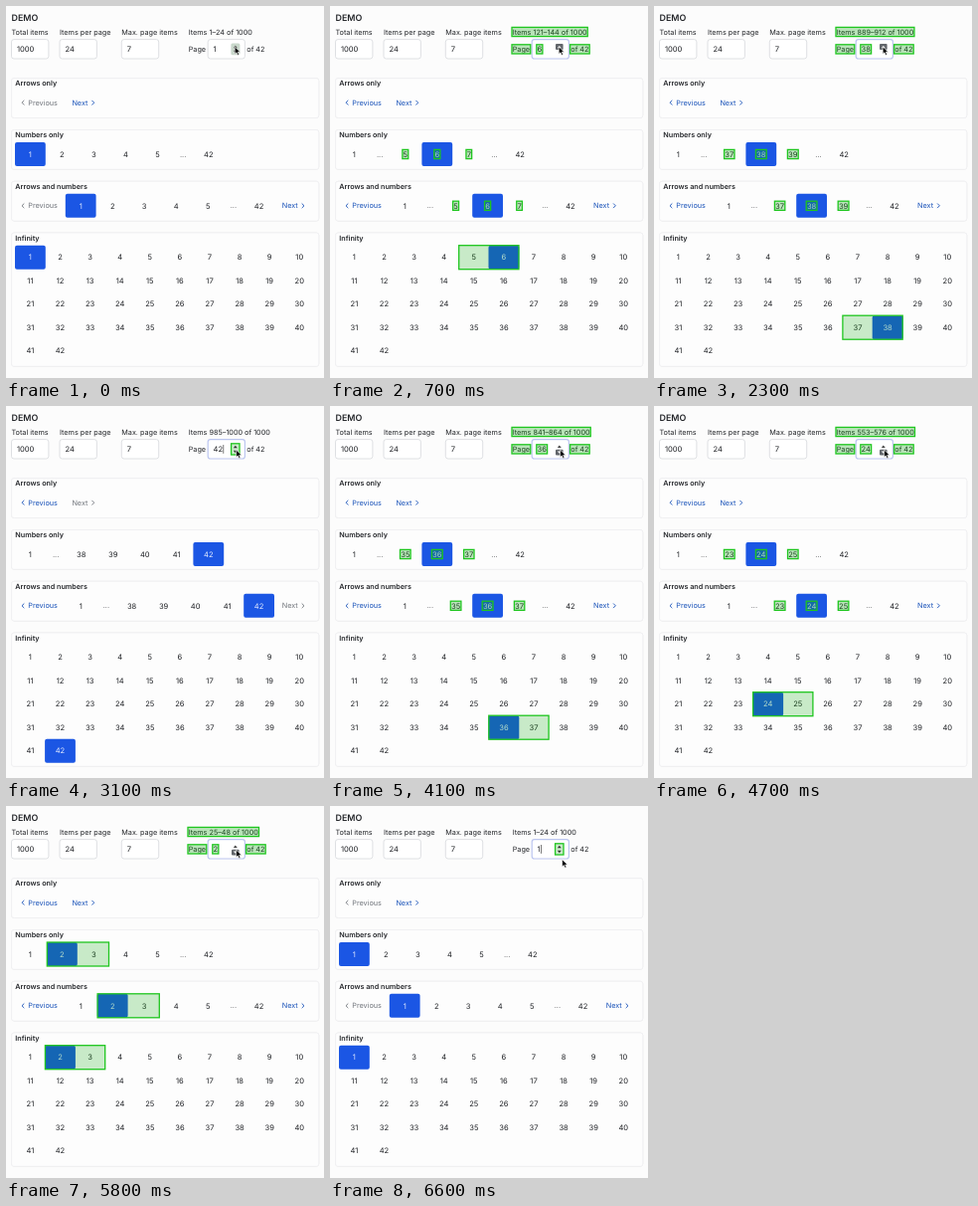
Recreate the animation shown at these times as an HTML page. Size 320 px wide and 374 px high, loop 6.7 s.

```html
<!DOCTYPE html>
<html lang="en">
<head>
<meta charset="utf-8">
<title>Pagination demo</title>
<style>
  html, body { margin: 0; width: 100%; height: 100%; overflow: hidden; background: #fcfcfc; }
  svg { display: block; width: 100vw; height: 100vh; }
  text { font: 7.25px Inter, "Liberation Sans", sans-serif; fill: #222428; text-rendering: geometricPrecision; }
  .title { font-size: 7.2px; font-weight: 600; fill: #24262a; }
  .big { font-size: 8.9px; }
  .num { font-size: 7.6px; }
  .mid { text-anchor: middle; }
  .on { fill: #e4ecff; }
  .link { fill: #1650b8; stroke: #1650b8; }
  .off { fill: #70747b; stroke: #70747b; }
  text.link, text.off { stroke: none; }
  path.link, path.off { fill: none; stroke-width: .9; }
  .card { fill: #fdfdfd; stroke: #efeff1; stroke-width: .8; filter: drop-shadow(0 .5px .5px rgb(0 0 0 / .09)); }
  .field { fill: #fff; stroke: #d6d8dc; stroke-width: .8; }
  .focus { stroke: #bcc6f0; stroke-width: 1.2; }
  .btn { fill: #1b56e4; }
  .flash { fill: rgb(0 160 0 / .21); stroke: #1fc61f; stroke-width: 1.3; }
  .word { fill: rgb(0 160 0 / .27); }
  .tip { font-size: 5.5px; fill: #ddd; }
</style>
</head>
<body>
<svg viewBox="0 0 320 374" preserveAspectRatio="none">
  <g id="base"></g>
  <g id="live"></g>
</svg>
<script>
const LOOP = 6700, STEP = 100, PAGES = 42, TOTAL = 1000, SIZE = 24;
const BTN = 30, DOTS = 17.4, GAP = 2, BTN_H = 24;
const TEXT_SIZE = 7.25, NUM_SIZE = 7.6;
const TIP_STEPS = [14, 17, 24, 30, 51, 57];

const pen = document.createElement('canvas').getContext('2d');
pen.font = '100px Inter, "Liberation Sans", sans-serif';

const clamp = (v, lo, hi) => Math.min(hi, Math.max(lo, v));
const isNum = s => typeof s === 'number';
const widthOf = s => pen.measureText(s).width / 100 * (isNum(s) ? NUM_SIZE : TEXT_SIZE);
const rect = (cls, x, y, w, h, r = 0) =>
  `<rect class="${cls}" x="${x}" y="${y}" width="${w}" height="${h}" rx="${r}"/>`;
// Text is placed by the vertical centre of its capitals.
const label = (s, x, y, cls = '') =>
  `<text class="${cls}${isNum(s) ? ' num' : ''}" x="${x}" y="${y + (isNum(s) ? 2.75 : 2.6)}">${s}</text>`;
const flash = (x, y, w, h) => rect('flash', x, y, w, h);
const flashText = (s, x, y) => rect('flash word', x - .7, y - 4.6, widthOf(s) + 1.4, 9.2);
const flashMid = (s, x, y) => flashText(s, x - widthOf(s) / 2, y);
const button = (x, y) => rect('btn', x - BTN / 2 - .4, y - BTN_H / 2, BTN + .8, BTN_H, 2);

function flashCells(a, b) {
  const cell = c => flash(c.x - 15.1, c.y - 12, 30.2, 24);
  if (a.y !== b.y) return cell(a) + cell(b);
  const left = Math.min(a.x, b.x);
  return flash(left - 15.1, a.y - 12, Math.abs(a.x - b.x) + 30.2, 24);
}

function base() {
  const fields = [['Total items', 1000, 5.5], ['Items per page', 24, 54], ['Max. page items', 7, 116.3]];
  const cards = [['Arrows only', 72.7, 39.8], ['Numbers only', 124.5, 39.8],
                 ['Arrows and numbers', 176.3, 39.8], ['Infinity', 228, 134.3]];
  return `<text class="title big" x="5.5" y="15.2">DEMO</text>` +
    fields.map(([name, v, x]) =>
      label(name, x, 26) + rect('field', x, 33.6, 37.4, 19.4, 2.5) + label(v, x + 5.4, 43.4)).join('') +
    cards.map(([name, y, h]) => rect('card', 5.6, y, 309.2, h, 2.5) + label(name, 9.3, y + 5.1, 'title')).join('');
}

// A click, a pause, then two pages per step while the stepper is held.
function pageAt(step) {
  if (step < 1) return 1;
  return step < 34 ? clamp(2 * step - 8, 2, PAGES) : clamp(118 - 2 * step, 1, PAGES - 1);
}

function itemsFor(p) {
  if (p < 5) return [1, 2, 3, 4, 5, 0, PAGES];
  if (p > 38) return [1, 0, 38, 39, 40, 41, PAGES];
  return [1, 0, p - 1, p, p + 1, 0, PAGES];
}

function arrow(next, x, y, enabled) {
  const cls = enabled ? 'link' : 'off';
  const tipX = next ? x + 20 : x - 4;
  const d = next ? `M${tipX} ${y - 2.3}l2.3 2.3-2.3 2.3` : `M${tipX} ${y - 2.3}l-2.3 2.3 2.3 2.3`;
  return label(next ? 'Next' : 'Previous', x, y, cls) + `<path class="${cls}" d="${d}"/>`;
}

// Draws the number row; returns its markup and the centre of the last button.
function numbers(x, y, p, prev, moving) {
  const at = {};
  let html = '', marks = '', last = 0;
  for (const n of itemsFor(p)) {
    const w = n ? BTN : DOTS;
    last = x + w / 2;
    if (n) at[n] = { x: last, y };
    if (n === p) html += button(last, y);
    html += label(n || '...', last, y, n === p ? 'mid on' : 'mid');
    x += w + GAP;
  }
  if (moving) {
    marks = p > 4 && p < 39
      ? [p - 1, p, p + 1].map(n => flashMid(n, at[n].x, y)).join('')
      : flashCells(at[p], at[prev]);
  }
  return { html: html + marks, last };
}

const cellAt = n => ({ x: 24.4 + (n - 1) % 10 * 30.1, y: 252.7 + Math.floor((n - 1) / 10) * 23.5 });

function grid(p, prev, moving) {
  let html = '';
  for (let n = 1; n <= PAGES; n++) {
    const { x, y } = cellAt(n);
    if (n === p) html += button(x, y);
    html += label(n, x, y, n === p ? 'mid on' : 'mid');
  }
  return html + (moving ? flashCells(cellAt(p), cellAt(prev)) : '');
}

function stepper(step) {
  const up = step > 0 && step < 26, down = step > 33 && step < 60;
  const arrowHead = (y, dir, color) =>
    `<path d="M228.8 ${y}h4l-2 ${2.4 * dir}z" fill="${color}"/>`;
  if (up) return `<rect x="227" y="38" width="7.6" height="6" rx="1" fill="#62666b"/>` + arrowHead(42.3, -1, '#fff');
  if (down) {
    return arrowHead(42, -1, '#444') +
      `<rect x="227" y="43.8" width="7.6" height="5.6" rx="1" fill="#62666b"/>` + arrowHead(45.4, 1, '#fff');
  }
  const box = step ? flash(226.6, 37.8, 8.4, 11.2)
    : `<rect x="226.4" y="37.5" width="9" height="11.8" rx="1.5" fill="#c9d8cb"/>`;
  return box + arrowHead(42.2, -1, '#333') + arrowHead(44.8, 1, '#333');
}

function cursor(step) {
  const drop = clamp((step - 26) / 4, 0, 1), leave = clamp((step - 63) / 3, 0, 1);
  const x = 230.2 + 1.4 * drop + 2 * leave, y = 40.9 + 3.2 * drop + 9.6 * leave;
  return `<path transform="translate(${x} ${y}) scale(1.08)" d="M0 0v6.8l1.6-1.4 1.1 2.5 1.3-.6-1.1-2.4h2.2z"
    fill="#000" stroke="#fff" stroke-width=".6"/>`;
}

function header(step, p, moving) {
  const first = (p - 1) * SIZE + 1;
  const range = `Items ${first}–${Math.min(p * SIZE, TOTAL)} of ${TOTAL}`;
  const texts = [[range, 183.7, 26], ['Page', 183.7, 43.4], [p, 208.5, 43.4], ['of 42', 242.3, 43.4]];
  let html = rect(step ? 'field focus' : 'field', 203.2, 33.6, 37.2, 19.4, 2.5);
  for (const t of texts) html += label(...t) + (moving ? flashText(...t) : '');
  if (step && !moving) html += `<rect x="${209 + widthOf(p)}" y="39" width=".6" height="8.8" fill="#222"/>`;
  return html + stepper(step);
}

function scene(step) {
  const p = pageAt(step), before = step ? pageAt(step - 1) : p;
  const moving = p !== before, prev = p - Math.sign(p - before);
  const row = numbers(9.4, 149, p, prev, moving);
  const full = numbers(60.2, 200.8, p, prev, moving);
  let html = header(step, p, moving) +
    arrow(false, 22.3, 97.2, p > 1) + arrow(true, 66.4, 97.2, p < PAGES) +
    row.html +
    arrow(false, 22.3, 200.8, p > 1) + full.html + arrow(true, full.last + 23.1, 200.8, p < PAGES) +
    grid(p, prev, moving);
  if (TIP_STEPS.includes(step)) {
    html += rect('', 0, 370.3, 107.5, 6, 1.5) + '<text class="tip" x="3" y="376.6">Rendering page items, please wait</text>';
  }
  return html + cursor(step);
}

const live = document.getElementById('live');
document.getElementById('base').innerHTML = base();
const start = performance.now();
let shown = -1;

function draw() {
  const step = Math.floor((performance.now() - start) % LOOP / STEP);
  if (step !== shown) live.innerHTML = scene(shown = step);
  requestAnimationFrame(draw);
}
draw();
</script>
</body>
</html>
```
